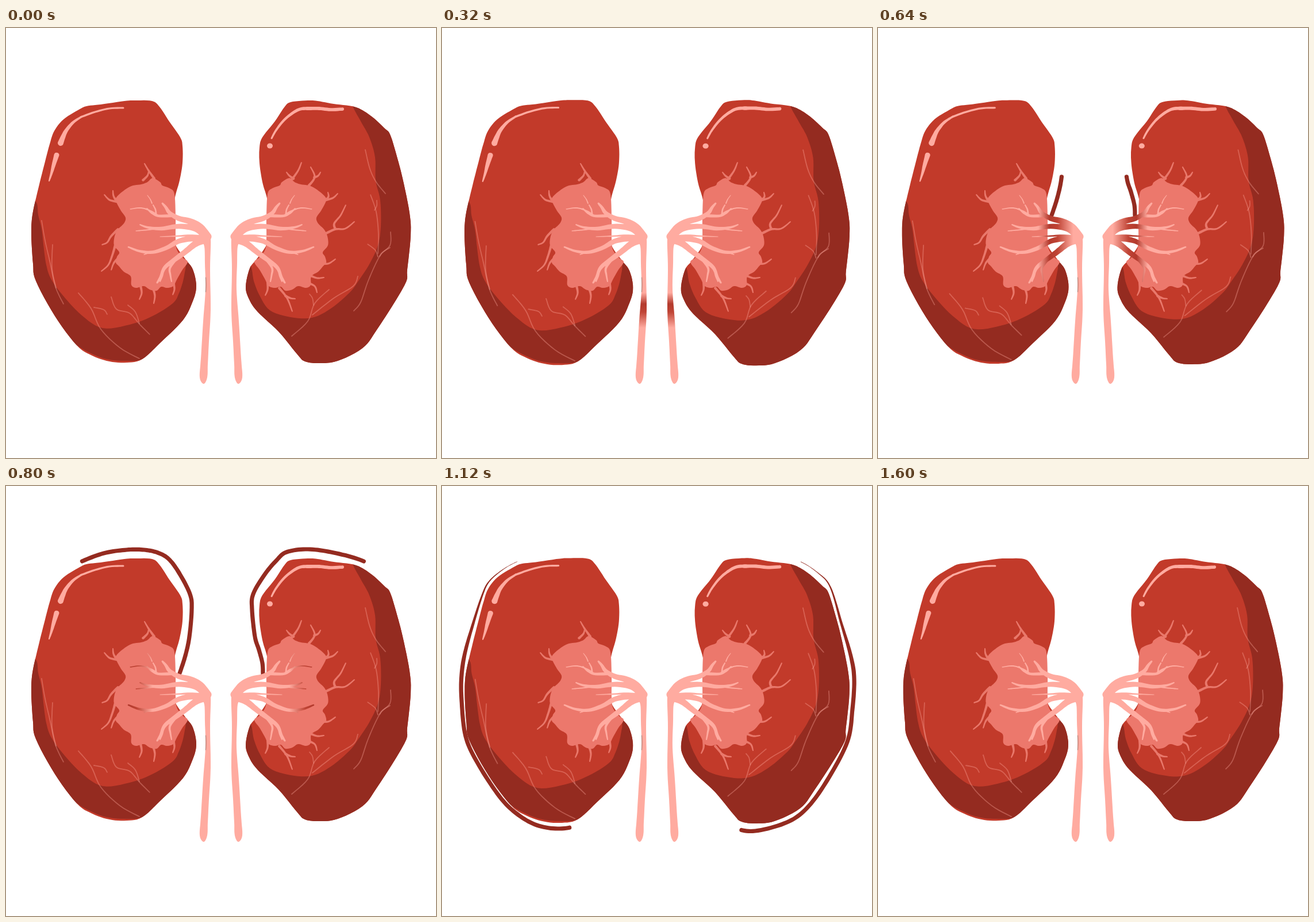
An HTML page for the animation above (1640 ms loop, 748x748 px).

```html
<!DOCTYPE html>
<html lang="en">
<head>
<meta charset="utf-8">
<title>Kidneys</title>
<style>
html, body { margin: 0; width: 100%; height: 100%; overflow: hidden; background: #fff; }
svg { display: block; width: 100vw; height: 100vh; }
</style>
</head>
<body>
<svg id="stage" viewBox="0 0 748 748"></svg>
<script>
const LOOP = 1640, STEP = 40, BEAT = 820;
const RED = '#c23a2a', DARK = '#942b20', ROSE = '#ec786c', PINK = '#ffaba0';

const pairs = s => s.trim().split(/\s+/).map(p => p.split(',').map(Number));
const f = n => n.toFixed(1);
const join = pts => pts.map(p => f(p[0]) + ' ' + f(p[1])).join('L');

// Catmull-Rom curve through the points, sampled n times per span
function spline(pts, n = 6, closed = false) {
  const m = pts.length, out = [];
  const at = i => closed ? pts[(i + m) % m] : pts[Math.max(0, Math.min(m - 1, i))];
  const spans = closed ? m : m - 1;
  for (let i = 0; i < spans; i++) {
    const [a, b, c, d] = [at(i - 1), at(i), at(i + 1), at(i + 2)];
    for (let k = 0; k < n; k++) {
      const u = k / n;
      out.push([0, 1].map(j => b[j] + u * ((c[j] - a[j]) / 2 +
        u * (a[j] - 2.5 * b[j] + 2 * c[j] - d[j] / 2 +
        u * (1.5 * (b[j] - c[j]) + (d[j] - a[j]) / 2)))));
    }
  }
  if (!closed) out.push(pts[m - 1]);
  return out;
}

const blob = s => 'M' + join(spline(pairs(s), 6, true)) + 'Z';

// Round-ended ribbon; each point is [x, y, radius]
function ribbon(pts) {
  if (pts.length < 2) return '';
  const left = [], right = [], last = pts.length - 1;
  pts.forEach(([x, y, r], i) => {
    const a = pts[Math.max(0, i - 1)], b = pts[Math.min(last, i + 1)];
    const dx = b[0] - a[0], dy = b[1] - a[1], k = r / (Math.hypot(dx, dy) || 1);
    left.push([x - dy * k, y + dx * k]);
    right.unshift([x + dy * k, y - dx * k]);
  });
  const cap = (r, p) => `A${f(r)} ${f(r)} 0 0 0 ${f(p[0])} ${f(p[1])}`;
  return 'M' + join(left) + cap(pts[last][2], right[0]) + 'L' + join(right) +
    cap(pts[0][2], left[0]) + 'Z';
}

function taper(w0, w1, s) {
  const pts = spline(pairs(s));
  return ribbon(pts.map((p, i) => [...p, (w0 + (w1 - w0) * i / (pts.length - 1)) / 2]));
}

const path = (d, fill, more = '') => `<path d="${d}" fill="${fill}" ${more}/>`;
const lines = (list, fill, w0, w1, more) =>
  list.map(s => path(taper(w0, w1, s), fill, more)).join('');

const left = {
  body: `206,127 225,126 254,127 267,137 285,164 303,190 307,205 307,235 302,265 295,290
    292,310 292,345 294,375 312,402 325,420 331,449 325,475 308,508 270,546 237,576 210,582
    180,580 150,570 123,552 85,501 52,440 47,410 44,360 46,325 56,280 66,240 76,202 84,179
    100,159 125,143 140,136 165,133`,
  shade: `30,295 52,302 56,325 62,350 66,385 70,412 78,436 98,464 132,500 168,522 215,516
    255,501 290,479 301,461 308,440 312,420 317,400 350,410 345,480 305,518 270,552 238,576
    205,579 175,576 150,567 122,551 80,515 30,440`,
  lines: ['62,335 68,370 76,405 86,450 100,480', '81,377 80,418 87,452',
    '126,461 148,488 165,524 198,556 232,575', '153,486 170,490 176,498',
    '183,468 192,489 215,496 232,515 250,533', '212,482 225,494 232,514'],
  tips: ['258,262 248,248 241,236', '238,265 246,257 248,250', '193,302 180,299 171,290',
    '192,301 187,292 186,283', '195,350 183,362 176,373 167,377',
    '190,378 185,395 178,412 166,423', '198,398 188,408 183,421',
    '234,448 236,461 232,472', '256,453 259,466 257,479', '291,440 293,454 290,464'],
  shine: path(taper(3, 3.5, '204,139 180,140 155,146 130,155'), PINK) +
    path(taper(3, 10, '132,154 117,164 105,178 99,190 95,200'), PINK) +
    path(taper(9, 2, '88,221 83,238 79,253 75,266'), PINK),
  ring: `302,326 312,295 319,262 323,215 320,188 301,151 283,127 264,116 240,111 210,111
    170,117 130,132 105,146 82,166 70,190 54,240 40,290 34,330 34,372 41,435 62,482 100,540
    130,570 165,590 205,596 240,588 275,561 327,505 340,470 341,432 332,405 314,390`
};

const right = {
  body: `542,127 525,126 495,129 484,138 468,162 446,190 441,208 441,235 446,268 453,292
    456,310 456,345 454,375 436,402 424,418 417,450 423,472 438,494 475,529 507,568 520,580
    545,583 577,579 620,557 645,525 693,448 698,420 704,360 702,322 690,262 679,220 668,185
    658,174 640,157 620,143 602,136 570,132`,
  shade: `600,120 604,138 618,164 632,190 642,225 643,265 651,300 652,345 647,378 632,411
    613,440 598,460 565,488 532,504 495,503 459,491 441,465 431,440 424,412 400,420 395,480
    470,560 510,610 600,605 740,460 730,220 670,130`,
  lines: ['625,212 633,245 644,268 660,288', '634,290 644,320 648,360 647,392',
    '647,398 642,386 629,376', '641,317 645,309 645,300',
    '669,355 668,378 650,397 630,440 617,477 605,492', '668,382 655,390 650,397',
    '612,432 604,449 570,470 533,499', '562,455 537,479 525,510 497,536', '535,482 533,470 528,463'],
  tips: ['492,270 507,250 514,234', '500,262 493,257 488,251', '527,274 537,259 530,242',
    '536,260 543,257 547,251', '552,300 568,296 577,288', '557,299 561,293 560,286',
    '557,357 573,350 590,349 606,337', '573,350 571,340 582,326 591,308',
    '543,409 560,410 573,402', '528,430 541,435 553,434', '475,452 489,470 498,493',
    '486,466 495,470 503,471', '455,440 455,455 451,465', '524,443 537,449 541,460'],
  shine: path(taper(5.5, 6, '586,141 565,142 545,140 525,140'), PINK) +
    path(taper(6, 3, '528,140 512,141 497,149 482,162 469,179 462,192'), PINK) +
    `<ellipse cx="459" cy="205" rx="5" ry="4.5" fill="${PINK}"/>`,
  ring: `447,327 446,308 440,285 433,262 428,215 430,188 450,154 470,130 488,115 525,110
    570,116 620,130 655,152 676,177 695,240 711,295 717,335 714,388 705,445 670,512 635,560
    600,585 545,600 510,595 475,575 425,525 407,480 406,440 415,410 434,390`
};

const pelvis = blob(`293,289 295,330 295,365 297,385 308,400 316,407 306,422 297,438 291,449
  280,452 270,450 262,457 250,455 240,449 226,452 218,447 217,432 205,424 197,415 191,408
  193,398 197,390 188,378 189,362 195,350 205,340 208,330 200,318 192,303 191,296 202,285
  218,275 235,272 246,268 255,261 268,268 272,274 285,279`);

const ureter = blob(`350,357 356,366 355,420 356,490 353,545 351,585 350,608 344,619 337,608
  339,575 343,510 347,455 346,410 345,380 339,366`);

const branches = [
  [15, 3, '350,363 338,347 322,337 300,331 285,322 278,312 272,305'],
  [6, 2, '292,326 267,327 254,322 245,314'],
  [3, 1.5, '264,326 251,318 235,313 216,315'],
  [3, 2, '261,324 260,316 256,308'],
  [13, 2, '348,363 330,349 300,345 270,349 247,347 233,342'],
  [3, 1.5, '265,348 247,351 226,353'],
  [5, 1, '343,363 320,361 297,362 268,363'],
  [12, 2.5, '348,368 325,366 300,371 280,382 255,390 232,388 213,381'],
  [3, 1.5, '262,389 250,391 240,394'],
  [13, 3, '348,368 330,375 311,390 292,404 276,417 269,433 263,443'],
  [5, 2, '294,404 285,418 286,430 288,441'],
  [3, 2, '274,421 272,431 268,441'],
  [2, 1, '254,305 251,298 246,291']
].map(b => taper(...b)).join('');

const kidney = (k, id, cx) => `
  <g class="body" data-cx="${cx}">
    <clipPath id="${id}"><path d="${blob(k.body)}"/></clipPath>
    ${path(blob(k.body), RED)}
    <g clip-path="url(#${id})">${path(blob(k.shade), DARK)}</g>
    ${lines(k.lines, PINK, 1.8, 1.8, 'opacity=".35"')}
    ${k.shine}
  </g>
  ${lines(k.tips, '#e9786b', 4.5, 2)}`;

const grad = id => `<linearGradient id="${id}" gradientUnits="userSpaceOnUse">
  <stop offset="0" stop-color="${PINK}"/><stop offset=".32" stop-color="#b33a2d"/>
  <stop offset=".55" stop-color="#bf4435"/><stop offset="1" stop-color="${PINK}"/></linearGradient>`;

const MIRROR = 'transform="translate(748) scale(-1 1)"';
const stage = document.getElementById('stage');
stage.innerHTML = `
  <defs>${grad('rise')}${grad('spread')}</defs>
  ${kidney(left, 'clipL', 269)}${kidney(right, 'clipR', 479)}
  ${path(pelvis, ROSE)}${path(pelvis, ROSE, MIRROR)}
  <path class="ring" fill="${DARK}"/><path class="ring" fill="${DARK}"/>
  <g id="vessels">
    ${path(ureter, 'url(#rise)')}
    ${path(branches, 'url(#spread)')}
  </g>
  <use href="#vessels" ${MIRROR}/>
  ${path(taper(1, 1, '347.5,434 348,446 347.5,459'), '#a5776c')}`;

const bodies = stage.querySelectorAll('.body');
const ringEls = stage.querySelectorAll('.ring');
const rise = document.getElementById('rise');
const spread = document.getElementById('spread');

// Ring points carry their share (0..1) of the whole length
const rings = [left, right].map(k => {
  const pts = spline(pairs(k.ring), 10);
  let sum = 0;
  const far = pts.map((p, i) => i ? sum += Math.hypot(p[0] - pts[i - 1][0], p[1] - pts[i - 1][1]) : 0);
  return pts.map((p, i) => [...p, far[i] / sum]);
});

function trim(pts, tail, head) {
  const out = [], radius = s => 3.6 * Math.max(0.1, Math.min(1, (s - tail) / 0.17));
  const add = (x, y, s) => out.push([x, y, radius(s)]);
  for (let i = 0; i < pts.length; i++) {
    const [x, y, s] = pts[i];
    if (i) {
      const [px, py, ps] = pts[i - 1];
      for (const cut of [tail, head]) {
        if (cut > ps && cut < s) {
          const u = (cut - ps) / (s - ps);
          add(px + (x - px) * u, py + (y - py) * u, cut);
        }
      }
    }
    if (s >= tail && s <= head) add(x, y, s);
  }
  return ribbon(out);
}

function setGrad(el, a, b) {
  for (const k in a) { el.setAttribute(k + '1', a[k]); el.setAttribute(k + '2', b[k]); }
}

function draw(t) {
  const swell = (1 - Math.cos(2 * Math.PI * t / BEAT)) / 2;
  for (const g of bodies) {
    const cx = g.dataset.cx;
    g.setAttribute('transform', `translate(${cx} 187) scale(${1 + 0.0245 * swell} ${1 + 0.0118 * swell}) translate(${-cx} -187)`);
  }

  const y = 660 - 0.53 * t, x = 350 - 0.53 * (t - 562);
  setGrad(rise, { x: 0, y: y - 30 }, { x: 0, y: y + 31 });
  setGrad(spread, { x: x - 30, y: 0 }, { x: x + 31, y: 0 });

  const head = Math.min(1, (t - 603) / 660), tail = (t - 922) / 660;
  rings.forEach((r, i) =>
    ringEls[i].setAttribute('d', head > 0 && tail < 1 ? trim(r, tail, head) : ''));
}

const start = performance.now();
function tick() {
  const t = (performance.now() - start) % LOOP;
  draw(Math.floor(t / STEP) * STEP);
  requestAnimationFrame(tick);
}
tick();
</script>
</body>
</html>
```
